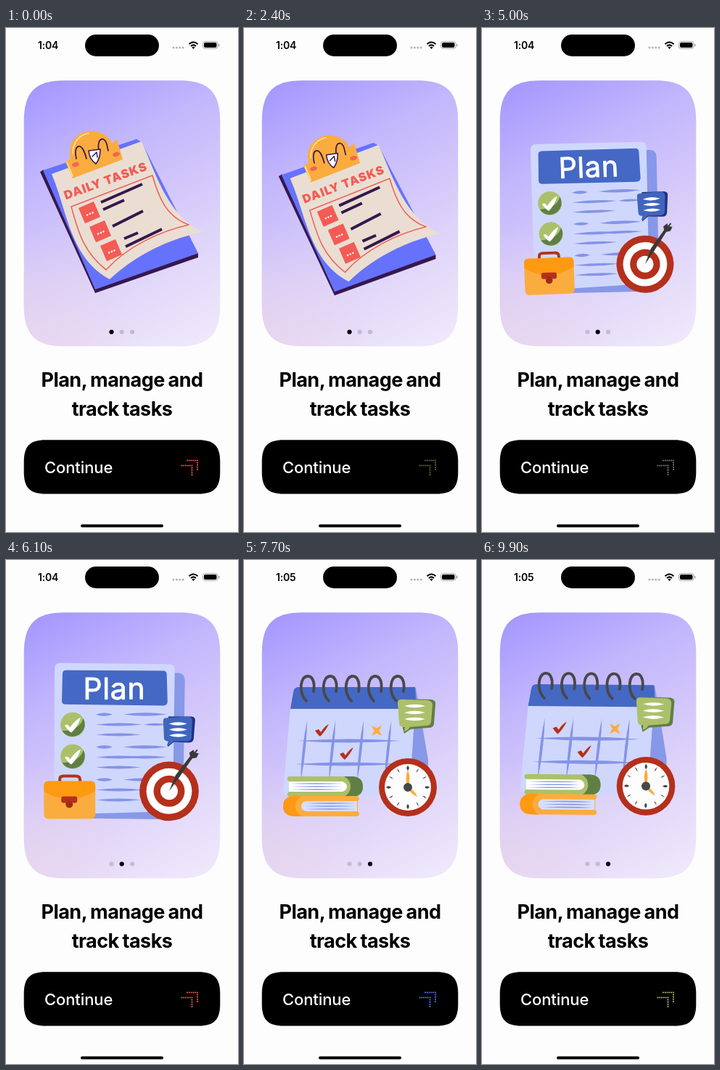
These frames come from a looping animation (320x694 px, 10000 ms). An HTML page:

```html
<!DOCTYPE html>
<html lang="en">
<head>
<meta charset="utf-8">
<title>Plan, manage and track tasks</title>
<style>
html, body { margin: 0; width: 100%; height: 100%; overflow: hidden; background: #fdfdfd; }
svg { display: block; width: 100%; height: 100%; }
text { font-family: Inter, Roboto, "Liberation Sans", sans-serif; }
</style>
</head>
<body>
<svg id="stage" viewBox="0 0 320 694"></svg>
<script>
const LOOP = 10000, PERIOD = 3000, CARD_W = 270;
const C = {
  red: '#b5301c', coral: '#f45b55', blue: '#4468c4', line: '#8593e6', shade: '#8798e8',
  paper: '#cfd7fd', leaf: '#acc06b', moss: '#5f7f45', amber: '#fbac3f', orange: '#fd9a12',
  ink: '#35184d', grey: '#484848'
};

const shape = (d, fill, extra = '') => `<path d="${d}" fill="${fill}" ${extra}/>`;
const stroke = (d, color, w, cap = 'butt') =>
  `<path d="${d}" fill="none" stroke="${color}" stroke-width="${w}" stroke-linecap="${cap}" stroke-linejoin="round"/>`;
const disc = (x, y, r, fill, extra = '') => `<circle cx="${x}" cy="${y}" r="${r}" fill="${fill}" ${extra}/>`;
const box = (x, y, w, h, r, fill) =>
  `<rect x="${x}" y="${y}" width="${w}" height="${h}" rx="${r}" fill="${fill}"/>`;
const range = n => [...Array(n).keys()];

// Line that is thick in the middle and pointed at both ends
function lens(x1, y1, x2, y2, h, fill) {
  const len = Math.hypot(x2 - x1, y2 - y1);
  const nx = -(y2 - y1) / len * h, ny = (x2 - x1) / len * h;
  const mx = (x1 + x2) / 2, my = (y1 + y2) / 2;
  return shape(`M${x1} ${y1}Q${mx + nx} ${my + ny} ${x2} ${y2}Q${mx - nx} ${my - ny} ${x1} ${y1}Z`, fill);
}

function squircle(x, y, w, h, r) {
  const a = 1.25 * r, b = 0.35 * r, R = x + w, B = y + h;
  return `M${x + a} ${y}H${R - a}C${R - b} ${y} ${R} ${y + b} ${R} ${y + a}V${B - a}` +
    `C${R} ${B - b} ${R - b} ${B} ${R - a} ${B}H${x + a}C${x + b} ${B} ${x} ${B - b} ${x} ${B - a}` +
    `V${y + a}C${x} ${y + b} ${x + b} ${y} ${x + a} ${y}Z`;
}

function tile(x, y) {
  const dots = range(3).map(i => disc(i * 4 - 4, 2, 1.3, '#fff')).join('');
  return `<g transform="translate(${x} ${y}) rotate(-23)">${box(-11.5, -11.5, 23, 23, 0.5, C.coral)}${dots}</g>`;
}

function clipboard() {
  const bars = 'M131 240L188 215M134 250L163 237M147 273L189 252M163 290L182 282M165 301L215 277';
  return shape('M47 198L52 195L125 356L265 310V316L123 365Z', C.ink) +
    shape('M51 196L180 153L187 157L265 310L123 360Z', '#6672fc') +
    shape('M63 201L187 156C205 196 222 258 271 281C225 290 178 313 143 346C88 317 84 250 63 201Z', '#eaded2') +
    stroke('M90 246L202 203C211 235 222 260 252 271C212 280 167 301 138 333C105 307 99 277 90 246Z', '#ee645c', 1.6) +
    `<text transform="translate(82.5 236.5) rotate(-20)" font-size="16.5" font-weight="900" letter-spacing="1.1" fill="${C.coral}">DAILY TASKS</text>` +
    tile(115, 254) + tile(130, 280) + tile(145, 306) +
    stroke(bars, C.ink, 4) +
    shape('M82 184L89 180C84 158 98 143 117 142C134 142 143 150 146 159L153 153L161 181L92 207Z', C.amber) +
    stroke('M84 185L92 204M92 173C92 156 102 147 114 145', '#ffe1a0', 1.6, 'round') +
    stroke('M97 180C94 166 98 162 102 163C107 165 109 173 111 180M128 170C126 156 130 152 134 153C139 155 139 161 141 169', C.ink, 1.7, 'round') +
    shape('M114 169L130 167Q130 180 124 187Q115 181 114 169Z', '#fff', `stroke="${C.ink}" stroke-width="1.6" stroke-linejoin="round"`) +
    stroke('M119 177L125 171L126 178', C.ink, 1.5, 'round') +
    '<ellipse cx="96" cy="188" rx="5" ry="3" fill="#f4644f" transform="rotate(-15 96 188)"/>' +
    '<ellipse cx="152" cy="174" rx="5" ry="3" fill="#f4644f" transform="rotate(-15 152 174)"/>';
}

function badge(x, y) {
  return `<g transform="translate(${x} ${y})">` + disc(0, 0, 17, C.leaf) +
    shape('M-14.7 8.5A17 17 0 0 0 14.7 -8.5Q9 8 -14.7 8.5Z', C.moss) +
    shape('M-11 1Q-7 -2 -4 4Q3 -6 11 -10Q7 3 -2 11Q-7 8 -11 1Z', '#fff') + '</g>';
}

function plan() {
  const rows = [212, 257, 302].map(y =>
    lens(124, y, 147, y, 4.5, C.line) + lens(162, y, 222, y, 4.5, C.line) +
    lens(124, y + 14, 188, y + 14, 4, C.line) + lens(124, y + 28, 186, y + 28, 4, C.line)).join('');
  return shape('M90 155H238Q247 156 247 165L244 349Q244 357 236 357L90 355Z', C.shade) +
    shape('M75 141L225 143Q233 143 233 151L230 339Q230 346 222 346L72 350Q66 350 66 342L67 149Q67 141 75 141Z', C.paper) +
    shape('M83 151L217 152Q222 152 222 157L223 194Q223 200 217 200L82 198Q77 198 77 193L78 156Q78 151 83 151Z', C.blue) +
    '<text x="149.5" y="191" font-size="41" font-weight="400" text-anchor="middle" fill="#fff" stroke="#fff" stroke-width=".9" stroke-linejoin="round" letter-spacing=".7">Plan</text>' +
    rows + lens(190, 226, 222, 226, 3.5, C.line) + lens(162, 271, 222, 271, 4, C.line) +
    badge(92, 226) + badge(92, 270) +
    shape('M224 215L256 215Q262 216 261 221L259 246Q258 251 252 251L232 250L223 257L224 250Z', '#1f3184') +
    shape('M221 217L250 215Q257 215 257 221L256 244Q255 249 250 249L231 249Q228 254 222 255L224 249Q218 249 218 244L217 221Q217 217 221 217Z', '#4065bd') +
    [225, 233, 241].map(y => lens(225, y, 250, y, 4.5, '#fff')).join('') +
    [[41, C.red], [31.5, '#fff'], [21.5, C.red], [12, '#fff']].map(([r, f]) => disc(225, 318, r, f)).join('') +
    shape('M225 318L234 296L254 270L253 265L259 261L260 265L266 266L263 272L257 273L239 299Z', '#393939') +
    stroke('M256 271L264 261', '#393939', 2) +
    stroke('M74 306V301Q74 297 79 297H96Q102 297 102 302V306', C.red, 4) +
    box(52, 304, 71, 52, 6, C.amber) +
    shape('M58 304H117Q123 304 123 310V318Q105 328 87 329Q68 328 52 318V310Q52 304 58 304Z', C.orange) +
    box(76, 325, 22, 9, 3, C.red) + disc(87, 336, 5, '#a32a18');
}

function calendar() {
  const rings = range(5).map(i =>
    `<g transform="translate(${31 * i} 0)">${stroke('M86 194C75 183 77 160 88 160C95 160 98 169 96 181', C.grey, 3.8, 'round')}</g>`).join('');
  const grid = [87, 126, 165, 203].map(x => lens(x, 221, x - 9, 305, 4, C.line)).join('') +
    lens(74, 249, 217, 249, 5, C.line) + lens(70, 281, 214, 281, 5, C.line);
  const tick = (x, y) =>
    shape(`M${x - 9} ${y + 1}L${x - 4} ${y - 1}L${x - 1} ${y + 3}Q${x + 4} ${y - 5} ${x + 10} ${y - 8}Q${x + 5} ${y + 2} ${x - 2} ${y + 9}Q${x - 5} ${y + 7} ${x - 9} ${y + 1}Z`, C.red);
  const marks = range(12).map(i =>
    `<g transform="rotate(${i * 30} 226 313)">${lens(226, 283, 226, 290, i % 3 ? 1.5 : 3.5, C.grey)}</g>`).join('');
  const pages = (x, y, w, color) =>
    [4, 8, 12].map(d => lens(x, y + d, x + w, y + d, 1.6, color)).join('');
  return shape('M234 176H237L254 275V312H222Z', C.shade) +
    shape('M64 204H236L228 325H60Q54 325 54 318Z', C.paper) +
    shape('M75 175H236L238 205H64L68 182Q69 175 75 175Z', C.blue) +
    grid + rings + tick(107, 234) + tick(141, 266) +
    lens(176, 228, 190, 242, 5, C.amber) + lens(190, 228, 176, 242, 5, C.amber) +
    shape('M218 191L258 192Q265 193 264 199L262 226Q261 231 255 231L230 233L221 239L219 232Z', C.moss) +
    shape('M217 192L253 193Q260 194 260 200L258 223Q257 228 252 228L229 230Q226 235 221 236L222 230Q214 230 214 225L212 197Q212 192 217 192Z', C.leaf) +
    [201, 210, 219].map(y => lens(221, y, 250, y, 4.5, '#fff')).join('') +
    disc(226, 313, 40, C.red) + disc(226, 313, 32, '#fdfdfd') + marks +
    lens(226, 313, 226, 289, 5, C.amber) + lens(226, 313, 239, 326, 4, C.amber) + disc(226, 313, 6, C.grey) +
    shape('M62 298H150Q164 299 164 312Q164 325 150 326H62Q57 323 62 319V305Q57 301 62 298Z', C.leaf) +
    shape('M138 298H150Q164 299 164 312Q164 325 150 326H138Q147 321 147 312Q147 303 138 298Z', C.moss) +
    shape('M62 305H136Q142 308 142 312Q142 317 136 319H62Z', '#fff') + pages(64, 304, 72, C.line) +
    shape('M157 325H69Q54 326 54 339Q54 352 69 353H157Q161 350 157 346V332Q161 328 157 325Z', C.amber) +
    shape('M80 325H69Q54 326 54 339Q54 352 69 353H80Q71 348 71 339Q71 330 80 325Z', C.orange) +
    shape('M156 332H85Q79 334 79 339Q79 344 85 346H156Z', '#d9defd') + pages(84, 331, 70, C.line);
}

function statusBar() {
  return `<text id="clock" x="44" y="29" font-size="14" font-weight="600" letter-spacing="-.2"></text>` +
    box(109, 9, 102, 30, 15, '#000') +
    range(4).map(i => disc(231 + i * 4.4, 27, 1.5, '#b4b4b4')).join('') +
    stroke('M252.5 22.2Q258.5 16.8 264.5 22.2M255 25Q258.5 21.8 262 25', '#000', 2) +
    shape('M256.3 26.6Q258.5 25 260.7 26.6L258.5 29Z', '#000') +
    '<rect x="271.5" y="18.5" width="20.5" height="10" rx="3.2" fill="none" stroke="#a8a8a8"/>' +
    box(273, 20, 17.5, 7, 2, '#000') + box(293, 21.8, 1.5, 3.6, 0.7, '#a8a8a8');
}

function arrow() {
  const corner = (x, y) =>
    range(6).map(i => disc(x + i * 2.8, y, 1.1, 'currentColor')).join('') +
    range(4).map(i => disc(x + 14, y + 3.1 * (i + 1), 1.1, 'currentColor')).join('');
  return `<g id="arrow">${corner(250, 595.5)}${corner(242.5, 602.5)}</g>`;
}

const title = (y, s) =>
  `<text x="160" y="${y}" font-size="27" font-weight="700" letter-spacing="-.55" word-spacing="-1" text-anchor="middle">${s}</text>`;
const card = squircle(24.7, 72.3, 270.6, 366, 45);

document.getElementById('stage').innerHTML = `
<defs>
  <linearGradient id="sky" gradientUnits="userSpaceOnUse" x1="25" y1="72" x2="225" y2="472">
    <stop offset="0" stop-color="#a294ff"/><stop offset=".3" stop-color="#c3b7fd"/>
    <stop offset=".65" stop-color="#ddd2f9"/><stop offset="1" stop-color="#f1eafb"/>
  </linearGradient>
  <radialGradient id="blush" gradientUnits="userSpaceOnUse" cx="35" cy="430" r="150">
    <stop offset="0" stop-color="#ebd5e8" stop-opacity=".6"/><stop offset="1" stop-color="#ebd5e8" stop-opacity="0"/>
  </radialGradient>
  <clipPath id="window"><path d="${card}"/></clipPath>
</defs>
<rect width="320" height="694" fill="#fdfdfd"/>
${statusBar()}
${shape(card, 'url(#sky)')}${shape(card, 'url(#blush)')}
<g clip-path="url(#window)">${[clipboard, plan, calendar].map(f => `<g class="page">${f()}</g>`).join('')}</g>
${[145.5, 159.7, 174].map(x => disc(x, 418.5, 3.1, '#000', 'class="dot"')).join('')}
${title(493.5, 'Plan, manage and')}${title(533.5, 'track tasks')}
${shape(squircle(24.7, 567.2, 270.6, 74.4, 24), '#000')}
<text x="53" y="613" font-size="22" font-weight="500" letter-spacing="-.1" fill="#fff">Continue</text>
${arrow()}
${box(103, 683.5, 114, 4, 2, '#000')}`;

const pages = document.querySelectorAll('.page');
const dots = document.querySelectorAll('.dot');
const clock = document.getElementById('clock');
const chevrons = document.getElementById('arrow');

// Lift of each page: middle, phase in degrees, time of that phase
const floats = [[0.17, 250, 0], [-0.5, 0, 3300], [-0.21, 65, 7700]];
const swipes = [2700, 6800], SWIPE = 400, MINUTE = 6500;
const RED = '#f0564f', BLUE = '#5b6cf5', GREEN = '#a3b86b';
const pulses = [[0, RED], [900, BLUE], [1750, '#c89090'], [2650, GREEN], [4000, BLUE], [5000, '#777'],
  [6100, RED], [6900, GREEN], [7700, BLUE], [8800, RED], [9900, GREEN]];

const clamp = v => Math.min(1, Math.max(0, v));
const ease = v => v * v * (3 - 2 * v);

function draw(t) {
  const at = swipes.reduce((sum, s) => sum + ease(clamp((t - s) / SWIPE)), 0);
  pages.forEach((page, i) => {
    const [mid, phase, t0] = floats[i];
    const lift = mid + 0.5 * Math.cos(phase * Math.PI / 180 + (t - t0) / PERIOD * 2 * Math.PI);
    const x = 160 + (i - at) * CARD_W;
    page.setAttribute('transform',
      `translate(${x} ${252 - 12.5 * lift}) rotate(${2.2 * lift}) scale(${1 + 0.038 * lift}) translate(-160 -252)`);
    page.style.display = Math.abs(i - at) < 1 ? '' : 'none';
  });
  dots.forEach((dot, i) => dot.setAttribute('fill', i === Math.round(at) ? '#000' : '#c5b9d6'));
  clock.textContent = t < MINUTE ? '1:04' : '1:05';

  const [peak, color] = pulses.reduce((a, b) => Math.abs(b[0] - t) < Math.abs(a[0] - t) ? b : a);
  const glow = Math.cos(clamp(Math.abs(t - peak) / 550) * Math.PI / 2) ** 2;
  chevrons.style.color = color;
  chevrons.style.opacity = glow;
}

const start = performance.now();
function tick() {
  draw((performance.now() - start) % LOOP);
  requestAnimationFrame(tick);
}
draw(0);
requestAnimationFrame(tick);
</script>
</body>
</html>
```
